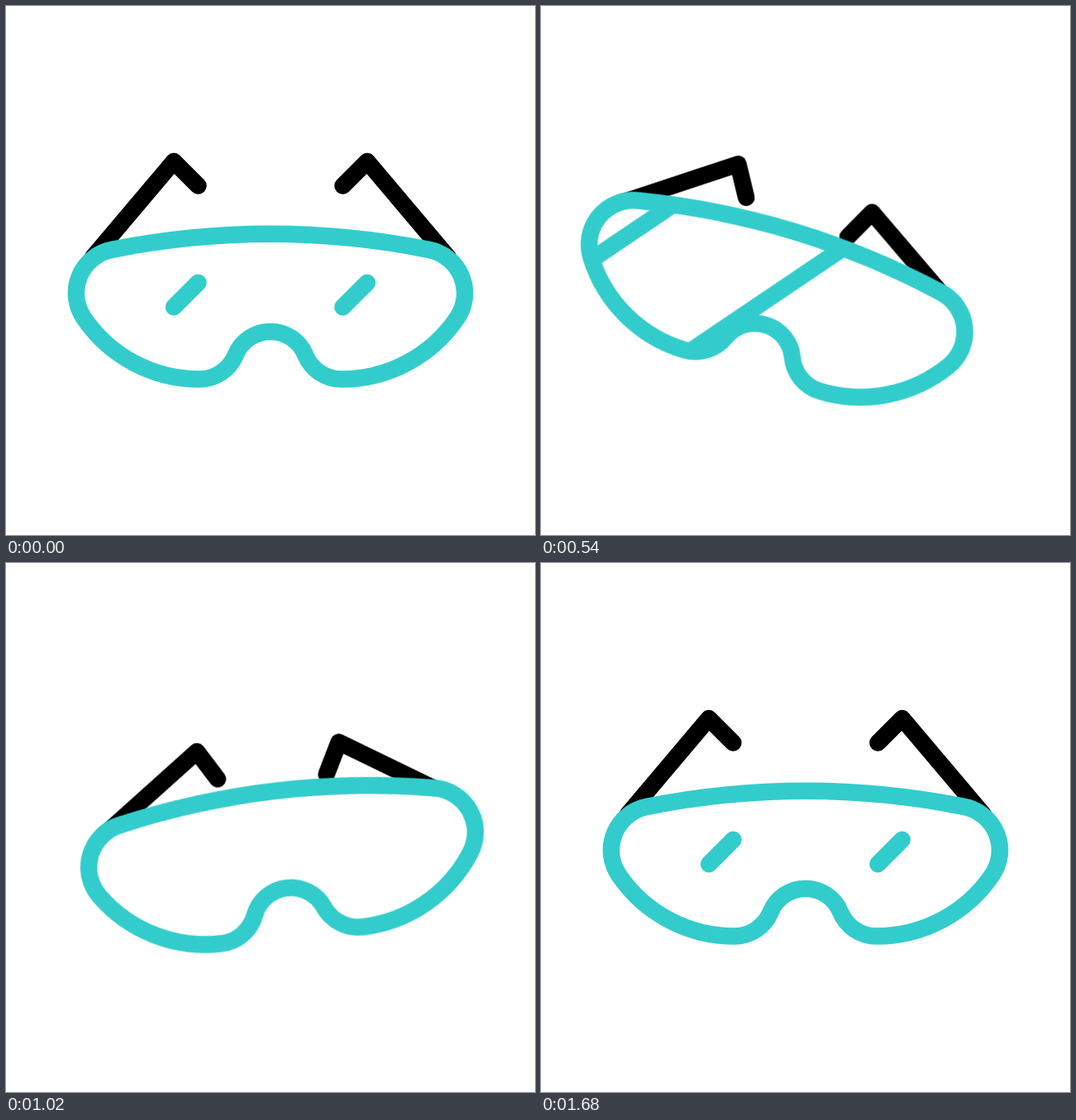
Animation of 640x640 px, one loop 2.4 s. Source, as an HTML page without scripts:

```html
<!DOCTYPE html>
<html lang="en">
<head>
<meta charset="utf-8">
<title>Safety goggles</title>
<style>
  html, body { margin: 0; width: 100%; height: 100%; overflow: hidden; background: #fff; }
  svg { display: block; width: 100vw; height: 100vh; }

  :root {
    --smooth: cubic-bezier(.333, 0, .667, 1);
    --fast: cubic-bezier(.33, 0, .15, 1);
  }

  path { fill: none; stroke: #3cc; stroke-width: 20.5; stroke-linecap: round; stroke-linejoin: round; }
  #lens { fill: #fff; }
  .arm { stroke: #000; }
  .left { --fold: 14.6deg; transform-origin: 102.7px 314px; }
  .right { --fold: 17.2deg; transform-origin: 93.5px 318px; }
  .goggles { transform-origin: 323px 228px; }

  .goggles, .arm, .slide, .glint { animation: 2400ms var(--smooth) infinite; }
  .goggles { animation-name: tilt; }
  .arm { animation-name: fold; }
  .slide { animation-name: sweep; }
  .glint { animation-name: stretch; }

  @keyframes tilt {
    0% { transform: rotate(0deg); animation-timing-function: var(--fast); }
    23.333% { transform: rotate(16.9deg); }
    45% { transform: rotate(-7.6deg); }
    66.667%, 100% { transform: rotate(0deg); }
  }
  @keyframes fold {
    0%, 70%, 100% { transform: rotate(0deg); }
    20%, 50.4% { transform: rotate(var(--fold)); }
  }
  /* leaves on the right, comes back from the upper left */
  @keyframes sweep {
    0% { transform: translate(0, 0); animation-timing-function: var(--fast); }
    23.333% { transform: translate(-98px, 0); }
    45% { transform: translate(610px, 0); animation-timing-function: step-end; }
    45.01% { transform: translate(-114px, -84px); }
    63.3%, 100% { transform: translate(0, 0); }
  }
  @keyframes stretch {
    0% { d: path("M-14.7 14.7L14.7 -14.7"); animation-timing-function: var(--fast); }
    23.333% { d: path("M-126 155L126 -155"); }
    45% { d: path("M-126 155L126 -155"); animation-timing-function: step-end; }
    45.01%, 100% { d: path("M-14.7 14.7L14.7 -14.7"); }
  }
</style>
</head>
<body>
<svg viewBox="0 0 640 640">
  <defs>
    <path id="lens" d="M128 294.9A985 985 0 0 1 512 294.9A53.5 53.5 0 0 1 545.8 377.5A169 169 0 0 1 406 451.5A47.4 47.4 0 0 1 362.1 422A45.6 45.6 0 0 0 277.9 422A47.4 47.4 0 0 1 234 451.5A169 169 0 0 1 94.2 377.5A53.5 53.5 0 0 1 128 294.9Z"/>
    <clipPath id="inside"><use href="#lens"/></clipPath>
  </defs>
  <g class="goggles">
    <path class="arm left" d="M105 304L203 188L232.5 217.5"/>
    <g transform="matrix(-1 0 0 1 640 0)">
      <path class="arm right" d="M105 304L203 188L232.5 217.5"/>
    </g>
    <use href="#lens"/>
    <g clip-path="url(#inside)">
      <g class="slide">
        <g transform="translate(217.8 349.5)"><path class="glint" d="M-14.7 14.7L14.7 -14.7"/></g>
        <g transform="translate(422.2 349.5)"><path class="glint" d="M-14.7 14.7L14.7 -14.7"/></g>
      </g>
    </g>
  </g>
</svg>
</body>
</html>
```
